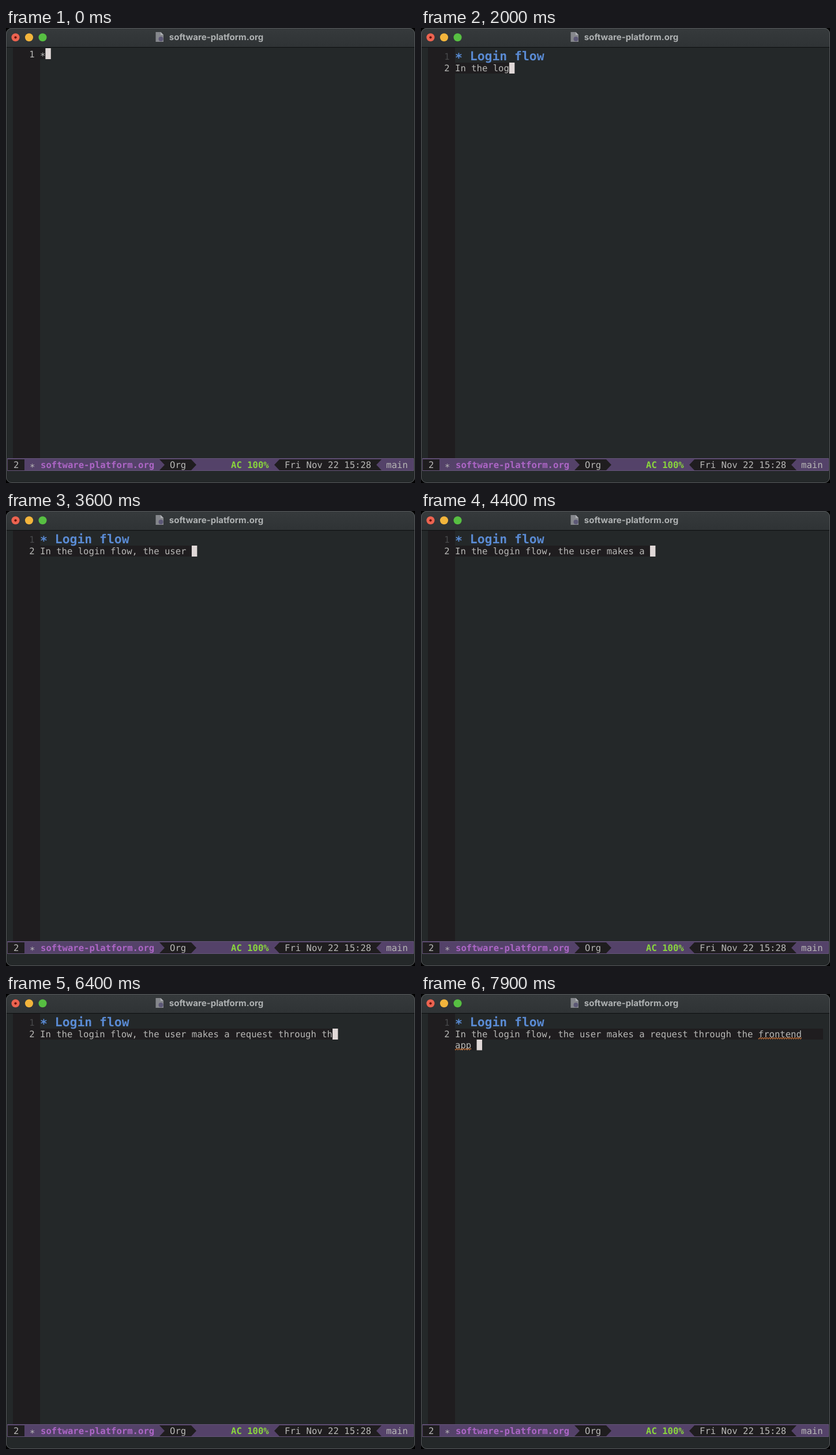
An HTML page that plays this animation: 709x789 px, repeating every 8 s.

```html
<!DOCTYPE html>
<html lang="en">
<head>
<meta charset="utf-8">
<title>Typing in an editor</title>
<style>
  html, body { margin: 0; width: 100%; height: 100%; overflow: hidden; background: #000; }
  svg { display: block; }
  text { white-space: pre; text-rendering: geometricPrecision; }
  .mono { font: 15.6px "DejaVu Sans Mono", monospace; fill: #b8b8b6; }
  .bold { font-weight: 700; }
  .head { font-size: 21.4px; font-weight: 700; fill: #5a8bd4; }
  .title { font: 700 15px Inter, sans-serif; fill: #aeb1b2; text-anchor: middle; }
  .dark { fill: #1f1d1f; }
  .wave { fill: none; stroke: #c9743a; stroke-width: 1.1; }
</style>
</head>
<body>
<svg width="709" height="789" viewBox="0 0 709 789">
  <defs>
    <linearGradient id="bar" x1="0" y1="0" x2="0" y2="1">
      <stop offset="0" stop-color="#363a3c"/>
      <stop offset="1" stop-color="#2f3335"/>
    </linearGradient>
    <clipPath id="window"><rect width="709" height="789" rx="10"/></clipPath>
  </defs>

  <g clip-path="url(#window)">
    <rect width="709" height="789" fill="#242829"/>
    <rect width="709" height="33" fill="url(#bar)"/>
    <rect y="33" width="709" height="1" fill="#0d0f10"/>
    <rect class="dark" x="12" y="34" width="47" height="712"/>

    <circle cx="16.5" cy="16.3" r="7" fill="#ec6350"/>
    <circle cx="16.5" cy="16.3" r="2.1" fill="#6b120a"/>
    <circle cx="40" cy="16.3" r="7" fill="#f3b53c"/>
    <circle cx="63.5" cy="16.3" r="7" fill="#57bf42"/>

    <path d="M259.5 7h8.5l5 5v12h-13.5z" fill="#85878c"/>
    <path d="M268 7v5h5z" fill="#b0b2b6"/>
    <circle cx="268.5" cy="19" r="4" fill="#5c5876"/>
    <text class="title" x="364.5" y="21.3">software-platform.org</text>

    <rect id="mark1" class="dark" x="59"/>
    <rect id="mark2" class="dark" x="59" y="79" height="18.5"/>
    <text id="num1" class="mono" x="40.2">1</text>
    <text id="num2" class="mono" x="40.2" y="75">2</text>
    <text id="star" class="mono" x="59">*</text>
    <text id="heading" class="mono head" y="55.5"></text>
    <text id="line1" class="mono" x="59" y="75"></text>
    <text id="line2" class="mono" x="59" y="94"></text>
    <path id="wave1" class="wave"/>
    <path id="wave2" class="wave"/>
    <rect id="cursor" width="9.4" fill="#e0d8d7"/>

    <rect x="2.5" y="746.5" width="704" height="21" fill="#544269" stroke="#66557a"/>
    <g class="dark">
      <path d="M3 748H32V767H3z"/>
      <path d="M266 748H321L330 757.5L321 767H266L275 757.5z"/>
      <path d="M474 748H651L642 757.5L651 767H474L465 757.5z"/>
    </g>
    <g class="mono">
      <text x="13" y="763">2</text>
      <text x="41" y="766.5">*</text>
      <text x="60" y="763" class="bold" fill="#ad66c6">software-platform.org</text>
      <text x="284" y="763">Org</text>
      <text x="390" y="763" class="bold" fill="#89d53c">AC 100%</text>
      <text x="483" y="763">Fri Nov 22 15:28</text>
      <text x="659" y="763">main</text>
    </g>
  </g>
  <rect x=".5" y=".5" width="708" height="788" rx="9.5" fill="none" stroke="#56595b"/>
</svg>

<script>
const HEADING = "* Login flow";
const BODY = "In the login flow, the user makes a request through the frontend app ";
const LEFT = 59, RIGHT = 697, PITCH = 9.39, HEAD_PITCH = 12.88;
const LOOP = 8000, TICK = 100, NEWLINE = 1000;
const WORD = BODY.indexOf("frontend"), WRAP = BODY.indexOf("app");

// [time in ms, characters on the current line]
const HEAD_KEYS = [[0, 1], [600, 9], [900, 12]];
const BODY_KEYS = [[1000, 0], [2000, 10], [2700, 19], [3600, 28], [4400, 36],
                   [4500, 36], [5400, 43], [6300, 53], [6400, 54], [7200, 61],
                   [7600, 65], [7800, 68], [7900, 69]];

const $ = id => document.getElementById(id);
const set = (id, attrs) => {
  for (const key in attrs) $(id).setAttribute(key, attrs[key]);
};
const show = (id, on) => { $(id).style.display = on ? "" : "none"; };
const columnX = n => LEFT + n * PITCH;

function typed(keys, t) {
  for (let i = 1; i < keys.length; i++) {
    const [t0, n0] = keys[i - 1], [t1, n1] = keys[i];
    if (t <= t1) return Math.floor(n0 + (n1 - n0) * (t - t0) / (t1 - t0) + 1e-6);
  }
  return keys[keys.length - 1][1];
}

function wavePath(x0, width, y) {
  let d = `M${x0} ${y}`;
  for (let x = 0; x <= width; x += 0.5) {
    d += `L${x0 + x} ${(y + 1.2 * Math.sin(x * Math.PI / 2)).toFixed(2)}`;
  }
  return d;
}

function drawHeading(n) {
  const styled = n > 1;
  $("star").classList.toggle("head", styled);
  set("star", { y: styled ? 59 : 54 });
  // The asterisk sits lower than the letters, so it has its own element.
  set("heading", { x: LEFT + 2 * HEAD_PITCH });
  $("heading").textContent = HEADING.slice(2, n);
  set("num1", { y: styled ? 55 : 50.5 });
}

function placeCursor(x, y, height) {
  set("cursor", { x, y, height });
}

function render(time) {
  const t = Math.floor(time / TICK) * TICK;
  const inBody = t >= NEWLINE;
  const n = typed(inBody ? BODY_KEYS : HEAD_KEYS, t);
  const wrapped = inBody && n > WRAP + 3;

  drawHeading(inBody ? HEADING.length : n);
  $("num1").style.fill = inBody ? "#48494b" : "#b8b8b6";
  show("num2", inBody);
  show("mark2", wrapped);
  show("wave1", inBody && n > WORD + 8);
  show("wave2", wrapped);
  $("line1").textContent = inBody ? BODY.slice(0, wrapped ? WRAP : n) : "";
  $("line2").textContent = wrapped ? BODY.slice(WRAP, n) : "";

  if (!inBody) {
    const width = n * (n > 1 ? HEAD_PITCH : PITCH);
    const height = n > 1 ? 25 : 19;
    set("mark1", { y: 35, width, height });
    placeCursor(LEFT + width, 35, height);
    return;
  }
  set("mark1", { y: 60, width: wrapped ? RIGHT - LEFT : n * PITCH, height: 19 });
  if (wrapped) {
    const width = (n - WRAP) * PITCH;
    set("mark2", { width });
    placeCursor(LEFT + width, 79, 18.5);
  } else {
    placeCursor(columnX(n), 60, 19);
  }
}

set("wave1", { d: wavePath(columnX(WORD), 8 * PITCH, 76.8) });
set("wave2", { d: wavePath(LEFT, 3 * PITCH, 95.8) });

const start = performance.now();
function frame() {
  render((performance.now() - start) % LOOP);
  requestAnimationFrame(frame);
}
frame();
</script>
</body>
</html>
```
